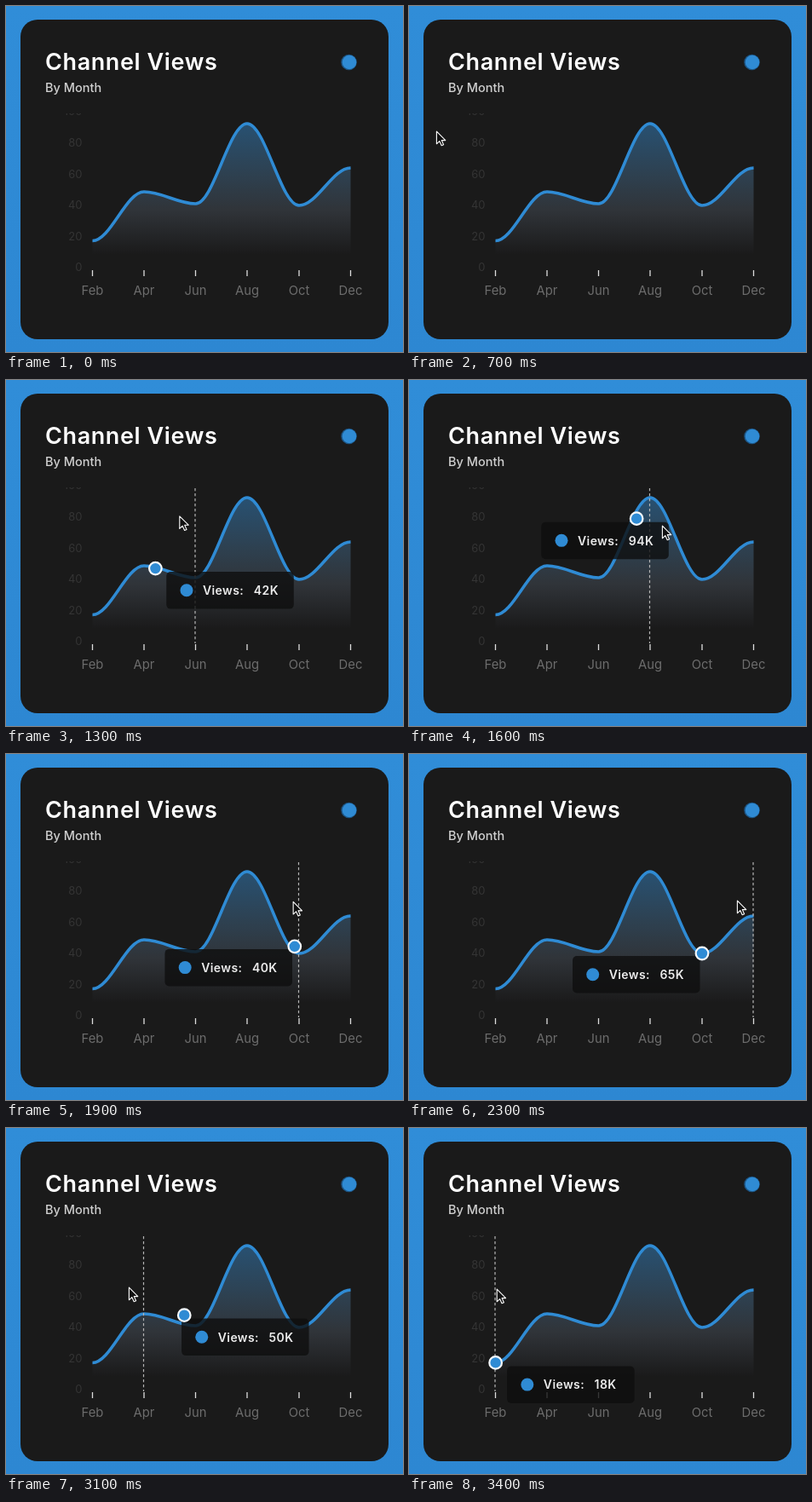
An HTML page that plays this animation: 466 by 406 pixels, repeating every 3.5 s.

```html
<!DOCTYPE html>
<html lang="en">
<head>
<meta charset="utf-8">
<title>Channel Views</title>
<style>
  html, body { margin: 0; width: 100%; height: 100%; overflow: hidden; background: #2e89d3; }
  svg { display: block; }
  text { font-family: Inter, "Open Sans", sans-serif; }
  .axis { font-size: 14.8px; fill: #6c6c6c; text-anchor: middle; }
  .scale { font-size: 13px; fill: #343434; text-anchor: end; }
  .tip { font-size: 14px; font-weight: 600; letter-spacing: .4px; fill: #ececec; }
</style>
</head>
<body>
<svg width="466" height="406" viewBox="0 0 466 406">
  <defs>
    <linearGradient id="back" x1="0" y1="0" x2="0" y2="1">
      <stop offset="0" stop-color="#308dd8"/>
      <stop offset="1" stop-color="#2d87d2"/>
    </linearGradient>
    <linearGradient id="fill" gradientUnits="userSpaceOnUse" x1="0" y1="138" x2="0" y2="292">
      <stop offset="0" stop-color="#285172"/>
      <stop offset=".4" stop-color="#2e404f"/>
      <stop offset=".66" stop-color="#303439"/>
      <stop offset="1" stop-color="#1a1a1a"/>
    </linearGradient>
    <clipPath id="plot"><rect x="60" y="126" width="60" height="190"/></clipPath>
  </defs>
  <rect width="466" height="406" fill="url(#back)"/>
  <rect x="17" y="16" width="432" height="375" rx="20" fill="#1a1a1a"/>
  <text x="46" y="75" font-size="27" font-weight="600" letter-spacing=".6" fill="#fff">Channel Views</text>
  <text x="46" y="101" font-size="14.5" font-weight="500" fill="#d0d0d0">By Month</text>
  <circle cx="402.5" cy="66" r="9.3" fill="#1d5482"/>
  <circle cx="403" cy="66" r="8.3" fill="#2f8bd4"/>
  <g id="scale" clip-path="url(#plot)"></g>
  <g id="months"></g>
  <path id="area" fill="url(#fill)"/>
  <path id="curve" fill="none" stroke="#2f8bd4" stroke-width="3.5"/>
  <path id="guide" d="M-.5 127V309" stroke="#b4b4b4" stroke-width="1.2" stroke-dasharray="3.2 2.8"/>
  <g id="tip">
    <rect width="149.5" height="43.5" rx="5" fill="#0e0e0e" fill-opacity=".8"/>
    <circle cx="23.7" cy="21.7" r="7.5" fill="#2f8bd4"/>
    <text class="tip" x="42.7" y="27">Views:</text>
    <text class="tip" id="value" x="102.5" y="27"></text>
  </g>
  <circle id="dot" r="7.3" fill="#2f8bd4" stroke="#f4f8fb" stroke-width="2.2"/>
  <path id="cursor" d="M.4 .2V14.8L3.8 11.6L6.2 16.8L8.6 15.8L6.3 10.6H10.8Z"
        fill="#111" stroke="#fff" stroke-width="1.1" stroke-linejoin="round"/>
</svg>
<script>
const $ = id => document.getElementById(id);
const LOOP = 3500, STEP = 100, EASE = 250, SMOOTH = .35;

// month, dot x, dot y, tooltip x, tooltip y, label
const points = [
  ['Feb', 101.5, 275.5, 115, 279.5, '18K'],
  ['Apr', 162, 218, 175, 222, '50K'],
  ['Jun', 222.5, 232, 235, 236, '42K'],
  ['Aug', 283, 138, 127, 142, '94K'],
  ['Oct', 344, 234, 192, 237, '40K'],
  ['Dec', 404.5, 190, 255, 194, '65K']
];
// time, index of the hovered month
const hovers = [[830, 0], [983, 1], [1280, 2], [1510, 3], [1760, 4],
  [2300, 5], [2710, 4], [2826, 3], [2949, 2], [3069, 1], [3180, 0]];
// time, pointer x, pointer y
const path = [[700, 32, 147], [1100, 141, 152], [1600, 297, 171], [2000, 350, 174],
  [2300, 385, 172], [2450, 396, 168], [2600, 360, 164], [2700, 323, 163],
  [3000, 186, 181], [3100, 144, 187], [3250, 104, 189], [3500, 102, 189]];

const svgText = (cls, x, y, s) => `<text class="${cls}" x="${x}" y="${y}">${s}</text>`;
const mix = (a, b, k) => a.map((v, i) => v + (b[i] - v) * k);
const move = (id, x, y) => $(id).setAttribute('transform', `translate(${x} ${y})`);
const show = (id, opacity) => $(id).setAttribute('opacity', opacity);

$('scale').innerHTML = [0, 20, 40, 60, 80, 100]
  .map(v => svgText('scale', 89.5, 311.3 - v * 1.83, v)).join('');
$('months').innerHTML = points.map(([name, x]) =>
  `<path d="M${x} 310V317" stroke="#ddd" stroke-width="1.3"/>` + svgText('axis', x, 339, name)).join('');

const line = points.map(([, x, y], i) => {
  if (!i) return `M${x} ${y}`;
  const [, px, py] = points[i - 1], reach = (x - px) * SMOOTH;
  return `C${px + reach} ${py} ${x - reach} ${y} ${x} ${y}`;
}).join('');
$('curve').setAttribute('d', line);
$('area').setAttribute('d', line + 'V292H101.5Z');

// Each hover starts an ease-out from wherever the previous one had got to.
function hoverState(t) {
  let pose, target;
  for (let i = 0; i < hovers.length && hovers[i][0] <= t; i++) {
    const [start, index] = hovers[i];
    const end = Math.min(t, hovers[i + 1] ? hovers[i + 1][0] : LOOP);
    const left = 1 - Math.min(1, (end - start) / EASE);
    target = points[index];
    const goal = target.slice(1, 5);
    pose = pose ? mix(pose, goal, 1 - left ** 3) : goal;
  }
  return { pose, target };
}

function pointerAt(t) {
  const i = path.findIndex(p => p[0] > t);
  const a = path[i - 1], b = path[i];
  return mix(a, b, (t - a[0]) / (b[0] - a[0]));
}

function draw(t) {
  const { pose, target } = hoverState(t);
  const fade = Math.max(0, Math.min(1, (t - hovers[0][0]) / 120));
  show('guide', pose ? 1 : 0);
  show('tip', fade);
  show('dot', fade);
  if (pose) {
    move('guide', target[1], 0);
    move('dot', pose[0], pose[1]);
    move('tip', pose[2], pose[3]);
    $('value').textContent = target[5];
  }
  const inside = t >= path[0][0];
  show('cursor', inside ? 1 : 0);
  if (inside) {
    const [, x, y] = pointerAt(t);
    move('cursor', x, y);
  }
}

const begin = performance.now();
function tick() {
  const t = (performance.now() - begin) % LOOP;
  draw(Math.floor(t / STEP) * STEP);
  requestAnimationFrame(tick);
}
tick();
</script>
</body>
</html>
```
